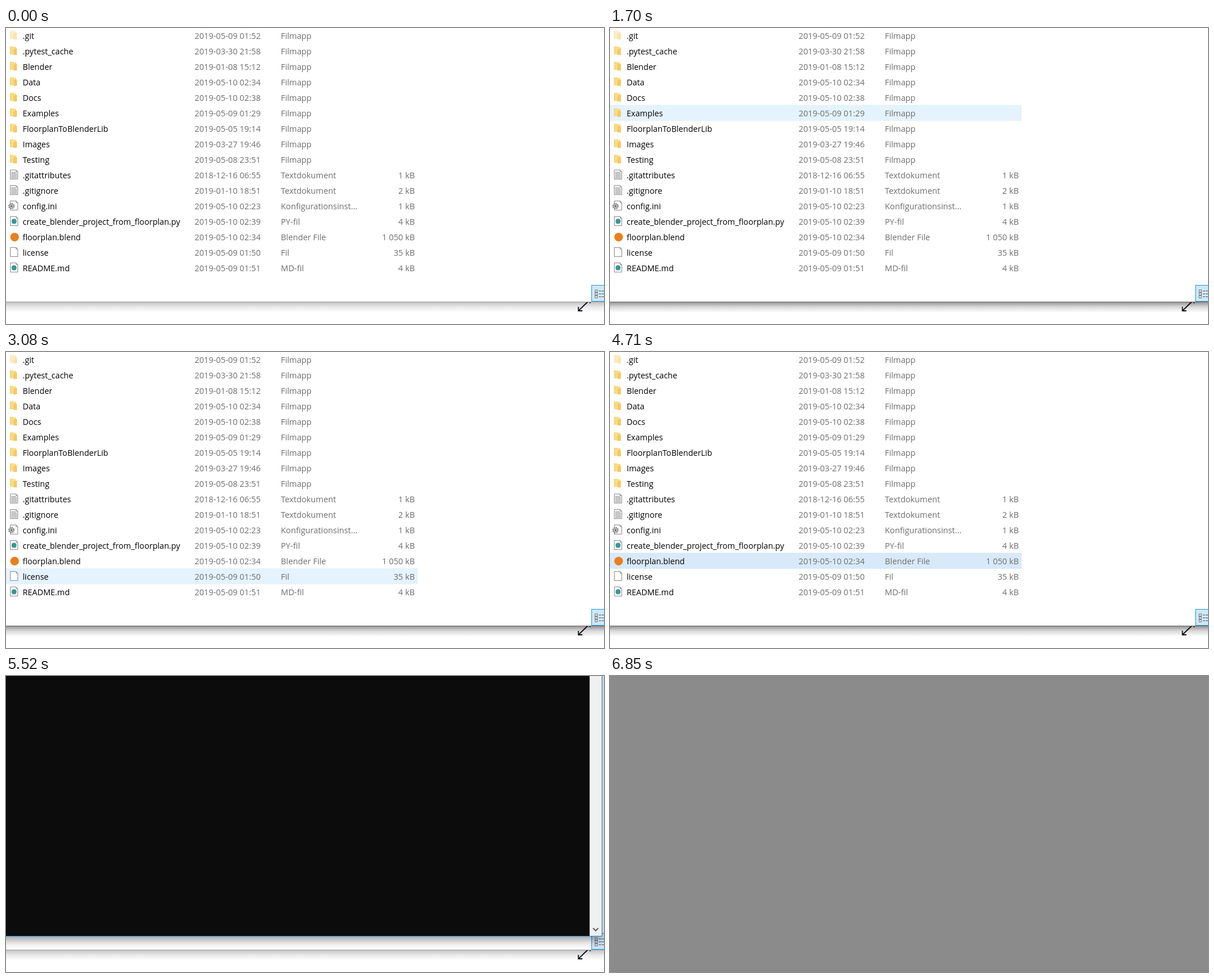
Write an HTML page that moves like this. It is 1040x516 px and loops after 8000 ms.

```html
<!DOCTYPE html>
<html lang="sv">
<head>
<meta charset="utf-8">
<title>File list</title>
<style>
  html, body { margin: 0; width: 100%; height: 100%; overflow: hidden; background: #fff; }
  #stage { position: relative; width: 1040px; height: 516px; overflow: hidden; background: #fff; }
  #stage > * { position: absolute; left: 0; top: 0; }
  svg { display: block; }
  text { font-family: "Open Sans", "Noto Sans", sans-serif; font-size: 14.3px; fill: #6d6d6d; white-space: pre; }
  text.name { font-size: 14.1px; fill: #000; }
  text.size { text-anchor: end; }
  #console { left: -60px; top: -60px; box-sizing: border-box; background: #0c0c0c; border: 1px solid; }
  #bar { position: absolute; right: 0; top: 0; bottom: 0; width: 21px; background: #f0f0f0; }
  #bar svg { position: absolute; left: 5px; bottom: 6px; }
  #cover { width: 1040px; height: 516px; background: #8b8b8b; }
</style>
</head>
<body>
<div id="stage">
  <svg width="1040" height="516" viewBox="0 0 1040 516">
    <defs>
      <linearGradient id="fade" x1="0" y1="0" x2="0" y2="1">
        <stop offset="0" stop-color="#000" stop-opacity="1"/>
        <stop offset=".45" stop-color="#000" stop-opacity=".36"/>
        <stop offset="1" stop-color="#000" stop-opacity="0"/>
      </linearGradient>
      <g id="folder">
        <path d="M7 5h6l1 1h4v13H7z" fill="#fbdc84"/>
        <path d="M13 11l2-2h4v11h-6z" fill="#f2ca66"/>
        <path d="M7 5h1.5v14H7z" fill="#f4cf70"/>
      </g>
      <g id="page">
        <path d="M7.5 5.5h10l3 3v13h-13z" fill="#fff" stroke="#8b8b8b"/>
        <path d="M17.5 5.5v3h3" fill="none" stroke="#8b8b8b"/>
      </g>
      <g id="doc">
        <use href="#page"/>
        <path d="M9 9.5h8M9 11.5h10M9 13.5h10M9 15.5h10M9 17.5h10M9 19.5h10" stroke="#909090"/>
      </g>
      <g id="ini">
        <use href="#page"/>
        <circle cx="9.5" cy="14.5" r="4.6" fill="#d4d4d4" stroke="#858585" stroke-width="2" stroke-dasharray="2 1.6"/>
        <circle cx="9.5" cy="14.5" r="3.6" fill="#cfcfcf" stroke="#8c8c8c"/>
        <circle cx="9.5" cy="14.5" r="1.5" fill="#555"/>
      </g>
      <g id="code"><use href="#page"/><circle cx="14" cy="14" r="4.5" fill="#369a93"/></g>
      <g id="blend"><circle cx="15" cy="14.5" r="7.5" fill="#ea7f1c"/></g>
    </defs>
    <rect id="hover" width="716" height="28"/>
    <g id="list"></g>
    <path d="M1011.5 477.5L996 492.5M995.5 486v7h7" fill="none" stroke="#171019" stroke-width="1.8"/>
    <path d="M1014.5 478h2v2h-1z" fill="#171019"/>
    <rect id="shade" y="478" width="1040" height="18" fill="url(#fade)"/>
    <rect id="edge" y="477" width="1040" height="1"/>
    <rect x="1018.5" y="448.5" width="30" height="28" fill="#cce8ff" stroke="#2a92d4"/>
    <g id="view" fill="none"></g>
  </svg>
  <div id="console">
    <div id="bar"><svg width="11" height="9"><path d="M1 1.5l4.5 4.5L10 1.5" fill="none" stroke="#606060" stroke-width="2"/></svg></div>
  </div>
  <div id="cover"></div>
</div>
<script>
const $ = id => document.getElementById(id);
const LOOP = 8000, ROW = 27;

// icon, name, date, type, size
const files = [
  ["folder", ".git", "2019-05-09 01:52", "Filmapp"],
  ["folder", ".pytest_cache", "2019-03-30 21:58", "Filmapp"],
  ["folder", "Blender", "2019-01-08 15:12", "Filmapp"],
  ["folder", "Data", "2019-05-10 02:34", "Filmapp"],
  ["folder", "Docs", "2019-05-10 02:38", "Filmapp"],
  ["folder", "Examples", "2019-05-09 01:29", "Filmapp"],
  ["folder", "FloorplanToBlenderLib", "2019-05-05 19:14", "Filmapp"],
  ["folder", "Images", "2019-03-27 19:46", "Filmapp"],
  ["folder", "Testing", "2019-05-08 23:51", "Filmapp"],
  ["doc", ".gitattributes", "2018-12-16 06:55", "Textdokument", "1 kB"],
  ["doc", ".gitignore", "2019-01-10 18:51", "Textdokument", "2 kB"],
  ["ini", "config.ini", "2019-05-10 02:23", "Konfigurationsinst...", "1 kB"],
  ["code", "create_blender_project_from_floorplan.py", "2019-05-10 02:39", "PY-fil", "4 kB"],
  ["blend", "floorplan.blend", "2019-05-10 02:34", "Blender File", "1 050 kB"],
  ["page", "license", "2019-05-09 01:50", "Fil", "35 kB"],
  ["code", "README.md", "2019-05-09 01:51", "MD-fil", "4 kB"]
];

$("list").innerHTML = files.map(([icon, name, date, type, size = ""], i) => {
  const lift = icon === "folder" ? 0 : -1;
  return `<g transform="translate(0 ${i * ROW})">
    <use href="#${icon}" y="${lift}" opacity="${i ? 1 : 0.5}"/>
    <text class="name" x="29" y="19">${name}</text>
    <text x="328" y="19">${date}</text>
    <text x="478" y="19">${type}</text>
    <text class="size" x="711" y="19">${size}</text></g>`;
}).join("");

$("view").innerHTML = [456, 461, 466].map(y =>
  `<rect x="1024.5" y="${y + 0.5}" width="4" height="4" fill="#fff" stroke="#777"/>
   <path d="M1026 ${y + 2.5}h1" stroke="#444"/>
   <path d="M1031 ${y + 2.5}h9" stroke="#555" stroke-dasharray="4 1"/>`).join("");

// time, row under the pointer
const hovers = [
  [0, -1], [920, 3], [1000, 6], [1070, 10], [1220, 7],
  [1700, 5], [1770, 3], [1850, 1], [1930, 2], [2010, 4], [2080, 6],
  [2160, 8], [2240, 9], [2320, 11], [2400, 12], [2480, 13],
  [3080, 14], [3330, 13], [3390, 12], [3710, 13]
];
const fills = [[0, "#e5f3ff"], [4710, "#d8eafa"], [4880, "#cce8ff"], [5270, "#d9d9d9"]];
const focus = [[0, 0], [60, 1], [5270, 0]];
// time, opacity, right edge, bottom edge
const opens = [[0, 0, 1012, 438], [5270, 0.35, 1012, 438], [5370, 0.74, 1029, 449], [5450, 0.94, 1034, 452], [5520, 1, 1037, 454]];
const covers = [[0, 0], [6610, 0.41], [6720, 0.8], [6785, 0.95], [6850, 1]];

const at = (steps, t) => steps.findLast(s => s[0] <= t);

function draw(t) {
  const row = at(hovers, t)[1];
  $("hover").setAttribute("y", row * ROW - 1);
  $("hover").setAttribute("fill", row < 0 ? "none" : at(fills, t)[1]);

  const active = at(focus, t)[1];
  $("shade").setAttribute("opacity", active ? 0.42 : 0.24);
  $("edge").setAttribute("fill", active ? "#707070" : "#a2a2a2");

  const [, alpha, right, bottom] = at(opens, t);
  const cover = at(covers, t)[1];
  const box = $("console").style;
  box.opacity = alpha;
  box.width = right + 60 + "px";
  box.height = bottom + 60 + "px";
  box.borderColor = cover ? "#444" : "#1883d7";
  box.boxShadow = cover ? "0 2px 9px rgba(0,0,0,.3)" : "0 6px 16px rgba(0,0,0,.42)";
  $("cover").style.opacity = cover;
}

const start = performance.now();
function tick() {
  draw((performance.now() - start) % LOOP);
  requestAnimationFrame(tick);
}
tick();
</script>
</body>
</html>
```
